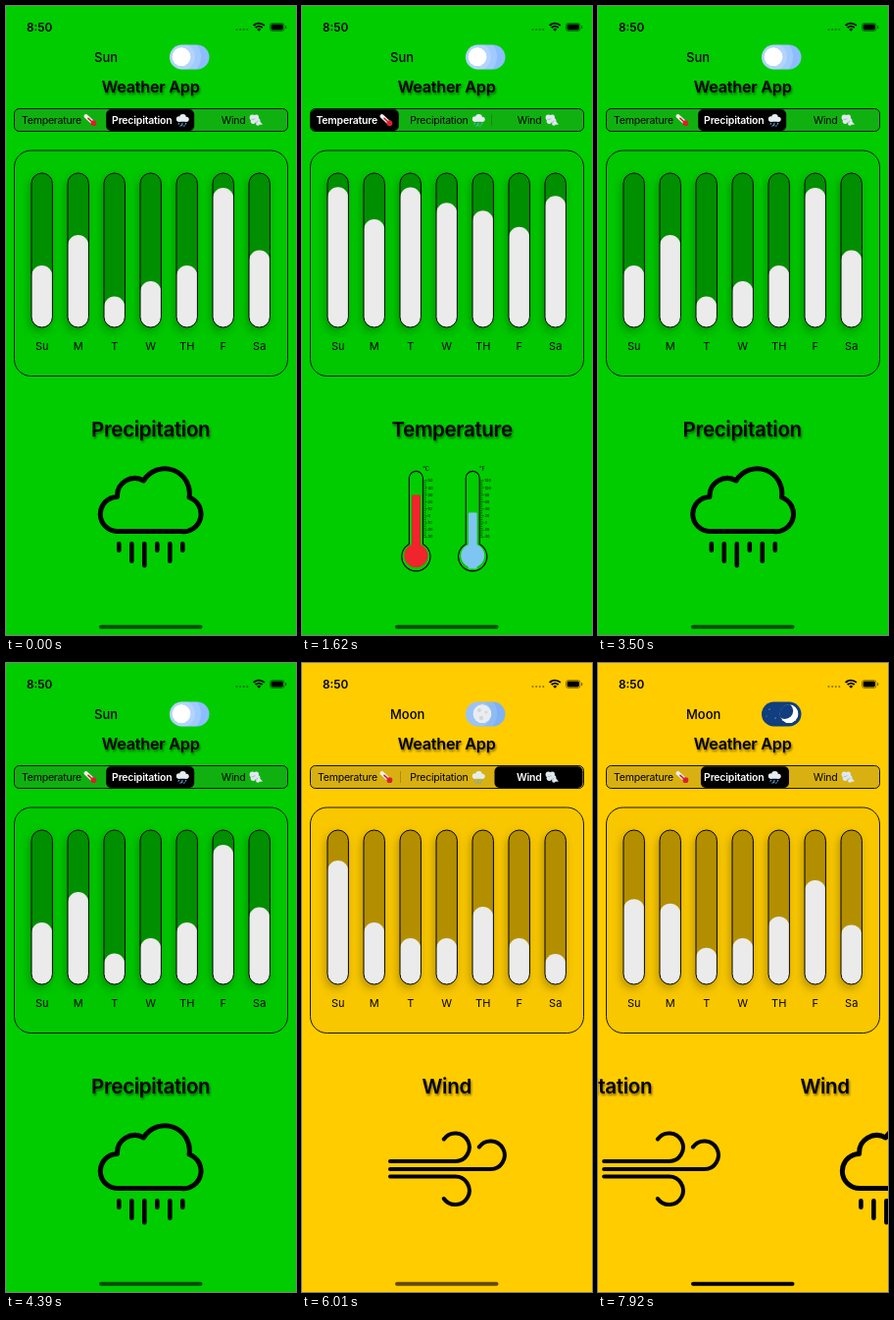
An HTML page that plays this animation: 296x640 px, repeating every 8000 ms.

```html
<!DOCTYPE html>
<html lang="en">
<head>
<meta charset="utf-8">
<title>Weather App</title>
<style>
html, body { margin: 0; width: 100%; height: 100%; overflow: hidden; background: #0c0; }
svg { display: block; width: 296px; height: 640px; font-family: Inter, Roboto, sans-serif; }
.title { font-size: 20.5px; font-weight: 600; letter-spacing: -.015em; text-anchor: middle; }
.app { font-size: 16.2px; }
.title, .app { filter: drop-shadow(1px 2px 1px rgba(0,0,0,.5)); }
.day { font-size: 11px; text-anchor: middle; }
.tab { font-size: 10.5px; letter-spacing: -.02em; text-anchor: end; }
.tab.on { fill: #fff; font-weight: 600; }
.line { fill: none; stroke: #000; stroke-linecap: round; stroke-linejoin: round; }
.scale { font-size: 4px; }
#tracks { filter: drop-shadow(-2px 4px 5px rgba(0,0,0,.28)); }
</style>
</head>
<body>
<svg id="stage" viewBox="0 0 296 640" xmlns="http://www.w3.org/2000/svg">
  <rect id="bg" width="296" height="640"/>

  <text x="21" y="25.6" font-size="11.8" font-weight="600">8:50</text>
  <g id="signal" opacity=".45"></g>
  <g class="line" stroke-width="1.9" style="stroke-linecap:butt">
    <path d="M252.6 19.9A8 8 0 0 1 263.8 19.9M254.7 22.1A5 5 0 0 1 261.7 22.1"/>
  </g>
  <path d="M256.2 23.7A2.8 2.8 0 0 1 260.2 23.7L258.2 25.8Z"/>
  <rect x="269.5" y="17.5" width="14.5" height="8" rx="2.4" fill="none" stroke="#000" stroke-opacity=".5" stroke-width=".8"/>
  <rect x="270.6" y="18.6" width="12.3" height="5.8" rx="1.4"/>
  <rect x="285" y="20" width="1.2" height="3" rx=".6" opacity=".5"/>

  <text id="mode" x="90" y="56.5" font-size="13" font-weight="500"></text>
  <clipPath id="pill"><rect x="167" y="39.5" width="40.5" height="25" rx="12.5"/></clipPath>
  <g clip-path="url(#pill)">
    <rect id="sky" x="167" y="39" width="41" height="26"/>
    <g id="halo" fill="#fff" fill-opacity=".18"><circle cx="179" cy="51.7" r="20"/><circle cx="179" cy="51.7" r="14"/></g>
    <g id="stars" fill="#fff"><circle cx="175" cy="47" r=".5"/><circle cx="181" cy="56" r=".5"/><circle cx="172" cy="54" r=".4"/></g>
    <clipPath id="disc"><circle cx="179" cy="51.7" r="9.6"/></clipPath>
    <g id="knob"><g clip-path="url(#disc)">
      <circle id="face" cx="179" cy="51.7" r="9.6"/>
      <g id="craters" fill="#c9cdd2"><circle cx="176" cy="48" r="2"/><circle cx="183" cy="50" r="1.5"/><circle cx="178" cy="56" r="2.2"/></g>
      <circle id="bite" cy="48.6" r="8.4"/>
    </g></g>
  </g>
  <text class="title app" x="147.7" y="88">Weather App</text>

  <rect x="8.5" y="104.5" width="279" height="23" rx="5" fill="#505050" fill-opacity=".22" stroke="#000" stroke-width=".9"/>
  <path id="sepA" d="M100.5 110V122" stroke="#000" stroke-opacity=".2"/>
  <path id="sepB" d="M193.5 110V122" stroke="#000" stroke-opacity=".2"/>
  <rect id="thumb" y="105.2" width="90" height="21.8" rx="5"/>
  <g id="tabs"></g>
  <g class="line">
    <path d="M81.5 112L88.5 118.5" style="stroke:#f4f0f0" stroke-width="4"/>
    <path d="M84 114.4L88.5 118.5" style="stroke:#d9202c" stroke-width="1.6"/>
  </g>
  <circle cx="89.4" cy="119.2" r="2.9" fill="#d9202c"/>
  <g fill="#e6edf0"><circle cx="176.5" cy="115" r="2.7"/><circle cx="180.5" cy="113.2" r="3.3"/><circle cx="184.2" cy="115.2" r="2.5"/><rect x="175" y="114.5" width="10.5" height="3.2" rx="1.5"/></g>
  <path class="line" style="stroke:#5aaee0" stroke-width="1.1" d="M176.5 119.3l-.5 1M180 119.3l-.5 2.4M183.7 119.3l-.5 1M178.2 121.6l-.3.7M182 121.6l-.3.7"/>
  <g fill="#dfe8ee"><circle cx="251.5" cy="113.5" r="2.9"/><circle cx="255.4" cy="113" r="2.6"/><circle cx="252.4" cy="117.2" r="2.7"/><circle cx="256.6" cy="116.8" r="2.8"/><circle cx="257" cy="120" r="1.8"/><path d="M257 115L262 120.5L256 121Z"/></g>
  <path class="line" style="stroke:#9db2c0" stroke-width=".8" d="M251 115.5q2 1.5 3-1M254.6 118.5q2 .6 2.6-1.6"/>

  <rect x="8.5" y="147" width="279" height="229.5" rx="17" fill="#000" fill-opacity=".025" stroke="#000" stroke-width=".9"/>
  <g id="tracks"></g><g id="fills" fill="#ebebeb"></g><g id="rims" fill="none" stroke="#000"></g><g id="days"></g>

  <g id="title0"><text class="title" x="148.3" y="437.5">Temperature</text></g>
  <g id="title1"><text class="title" x="147.7" y="437.5">Precipitation</text></g>
  <g id="title2"><text class="title" x="147.7" y="437.5">Wind</text></g>
  <g id="icon0"></g>
  <g id="icon1" class="line">
    <path stroke-width="5" d="M114 534.5A17.5 17.5 0 0 1 113.5 499.5A18 18 0 0 1 140.5 483A25.2 25.2 0 0 1 187 500A17.8 17.8 0 0 1 179 534.5Z"/>
    <path id="rain" stroke-width="4.6"/>
  </g>
  <g id="icon2" class="line" stroke-width="4">
    <path d="M90 507H156.5A14.3 14.3 0 1 0 144.8 484.5M90 515H192.5A14.3 14.3 0 1 0 180.8 492.5M90 522.5H156.5A14.3 14.3 0 1 1 144.8 545"/>
  </g>
  <rect id="home" x="95" y="629.7" width="105.5" height="4" rx="2"/>
</svg>
<script>
const LOOP = 8000, SLIDE = 237, FLOOR = 327;
const TEMP = 0, RAIN = 1, WIND = 2;
const tops = [
  [184, 217, 184, 200, 208, 225, 193],
  [264, 233, 295.5, 280, 264, 185, 248.5],
  [201, 264, 280, 280, 248, 280, 296]
];
// start, from, to, bar delay
const moves = [
  [996, RAIN, TEMP, 0],
  [2592, TEMP, RAIN, -10],
  [4655, RAIN, WIND, 0],
  [7787, WIND, RAIN, 6]
];
const TOGGLE = 5890, HOME_SOLID = 7440, TAB_LEAD = 150;
const thumbX = [8.8, 102.2, 196.5];
const titleDir = [1, -1, 1];
const iconDir = [[0, 1], [1, 0], [-1, 0]];

const $ = id => document.getElementById(id);
const set = (el, key, value) => el.setAttribute(key, value);
const mix = (a, b, p) => a + (b - a) * p;
const blend = (a, b, p) => `rgb(${a.map((v, i) => Math.round(mix(v, b[i], p)))})`;

function smooth(ms, w) {
  const x = Math.max(0, ms) / 1000 * w;
  return 1 - Math.exp(-x) * (1 + x);
}
function bouncy(ms) {
  const t = Math.max(0, ms) / 1000, w = 13, z = .65;
  const s = w * z, d = w * Math.sqrt(1 - z * z);
  return 1 - Math.exp(-s * t) * (Math.cos(d * t) + s / d * Math.sin(d * t));
}

function capsule(x, extra) {
  return `<rect x="${x}" y="170" width="21.4" height="157" rx="10.7" ${extra}/>`;
}
const columns = ['Su', 'M', 'T', 'W', 'TH', 'F', 'Sa'].map((name, i) => ({ name, x: 26 + 37 * i }));
$('tracks').innerHTML = columns.map(c => capsule(c.x, 'class="track"')).join('');
$('fills').innerHTML = columns.map(c => capsule(c.x, '')).join('');
$('rims').innerHTML = columns.map(c => capsule(c.x, '')).join('');
$('days').innerHTML = columns.map(c => `<text class="day" x="${c.x + 10.7}" y="350">${c.name}</text>`).join('');
$('tabs').innerHTML = [['Temperature', 77], ['Precipitation', 169.5], ['Wind', 244.5]]
  .map(([s, x]) => `<text class="tab" x="${x}" y="119.8">${s}</text>`).join('');
$('signal').innerHTML = [0, 1, 2, 3].map(i => `<circle cx="${235.5 + i * 3.6}" cy="24" r="1"/>`).join('');
set($('rain'), 'd', [8, 19, 23.5, 8, 19, 8].map((h, i) => `M${115.3 + 13 * i} 547.2v${h - 1.5}`).join(''));

function thermometer(x, color, level, unit, top, step) {
  let marks = '', labels = '';
  for (let i = 0; i <= 32; i++) marks += `M${x + 8} ${478 + i * 1.8}h${i % 4 ? 2 : 3.5}`;
  for (let i = 0; i < 9; i++)
    labels += `<text class="scale" x="${x + 12.2}" y="${479.6 + i * 7.1}">${Math.abs(top - step * i)}</text>`;
  return `<path d="M${x - 7} 542.6V475.5a7 7 0 0 1 14 0V542.6A14.6 14.6 0 1 1 ${x - 7} 542.6Z" fill="none" stroke="#000" stroke-width="1.1"/>
    <path d="M${x - 4.6} 550V494q0-1.5 1.5-1.5h6.2q1.5 0 1.5 1.5V550Z" transform="translate(0 ${level})" clip-path="inset(0)" fill="${color}"/>
    <circle cx="${x}" cy="554.5" r="12" fill="${color}"/>
    <path d="${marks}" stroke="#000" stroke-width=".5"/>${labels}
    <text x="${x + 6.8}" y="468.5" font-size="5.5">°${unit}</text>`;
}
$('icon0').innerHTML = thermometer(116.4, '#f0242c', 0, 'C', 50, 10) + thermometer(174.2, '#7fc5f2', 18, 'F', 120, 20);

const fills = [...$('fills').children], tabs = [...$('tabs').children];
columns.forEach((c, i) => set($('tracks').children[i], 'fill', '#008f00'));

function draw(t) {
  let from = RAIN, to = RAIN, p = 1, bar = 1;
  let tabFrom = RAIN, tabTo = RAIN, tabP = 1;
  for (const [start, a, b, delay] of moves) {
    if (t >= start - TAB_LEAD) {
      tabFrom = a; tabTo = b;
      tabP = smooth(t - start + TAB_LEAD, 19);
    }
    if (t >= start + Math.min(0, delay)) {
      from = a; to = b;
      p = smooth(t - start, 9.3);
      bar = bouncy(t - start - delay);
    }
  }

  fills.forEach((el, i) => {
    const y = mix(tops[from][i], tops[to][i], bar);
    set(el, 'y', y);
    set(el, 'height', FLOOR - y);
  });

  for (let i = 0; i < 3; i++) {
    const shown = i === to ? p : i === from ? 1 - p : 0;
    const off = (1 - shown) * SLIDE;
    set($('title' + i), 'transform', `translate(${off * titleDir[i]} 0)`);
    set($('icon' + i), 'transform', `translate(${off * iconDir[i][0]} ${off * iconDir[i][1]})`);
  }

  set($('thumb'), 'x', mix(thumbX[tabFrom], thumbX[tabTo], tabP));
  const active = tabP > .5 ? tabTo : tabFrom;
  tabs.forEach((el, i) => el.classList.toggle('on', i === active));
  set($('sepA'), 'opacity', active === WIND ? 1 : 0);
  set($('sepB'), 'opacity', active === TEMP ? 1 : 0);

  const night = t >= TOGGLE, q = night ? smooth(t - TOGGLE, 9.3) : 0;
  const sky = blend([140, 190, 255], [16, 62, 126], q * q);
  set($('bg'), 'fill', night ? '#ffcc00' : '#00cc00');
  for (const el of $('tracks').children) set(el, 'fill', night ? '#b38f00' : '#008f00');
  $('mode').textContent = night ? 'Moon' : 'Sun';
  set($('sky'), 'fill', sky);
  set($('bite'), 'fill', sky);
  set($('bite'), 'cx', mix(150, 174.8, Math.max(0, q * 1.6 - .6)));
  set($('face'), 'fill', night ? blend([225, 229, 232], [255, 255, 255], q) : '#fff');
  set($('craters'), 'opacity', night ? 1 - q : 0);
  set($('halo'), 'opacity', 1 - q);
  set($('stars'), 'opacity', q * q);
  set($('knob'), 'transform', `translate(${16 * q} 0)`);
  set($('home'), 'fill-opacity', t >= HOME_SOLID ? 1 : .62);
}

const begin = performance.now();
function tick() {
  draw((performance.now() - begin) % LOOP);
  requestAnimationFrame(tick);
}
tick();
</script>
</body>
</html>
```
